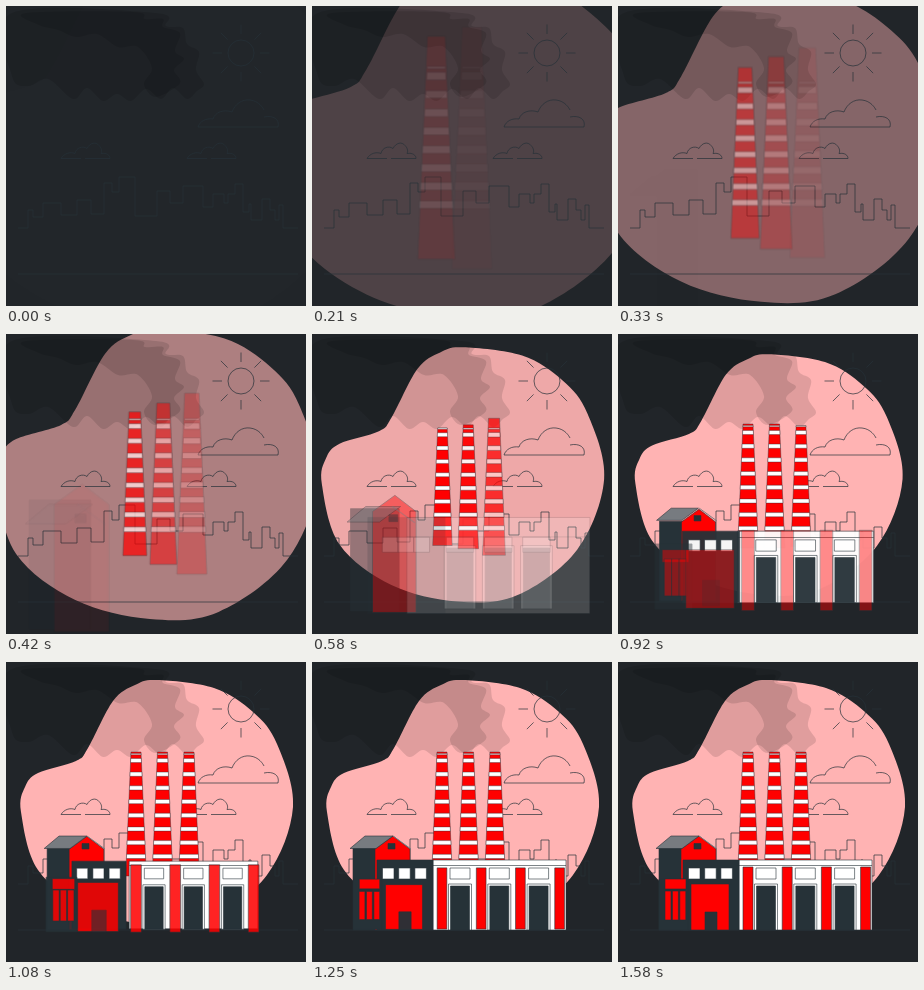
Animation, 300 px wide and 300 px high, one loop 1620 ms. Source, as an HTML page:

```html
<!DOCTYPE html>
<html lang="en">
<head>
<meta charset="utf-8">
<title>Factory</title>
<style>
html, body { margin: 0; width: 100%; height: 100%; overflow: hidden; background: #212529; }
svg { display: block; width: 100vw; height: 100vh; }
</style>
</head>
<body>
<svg id="stage" viewBox="0 0 300 300"></svg>
<script>
const INK = '#263238', RED = '#ff0000', WHITE = '#ffffff', GREY = '#777b80';
const LOOP = 1620, FRAME = 1000 / 24;
const START = -30, STEP = 110;
const stage = document.getElementById('stage');
const parts = [];

function add(parent, tag, attrs) {
  const el = document.createElementNS(stage.namespaceURI, tag);
  for (const key in attrs) el.setAttribute(key, attrs[key]);
  return parent.appendChild(el);
}

// Closed smooth curve through the points (Catmull-Rom)
function smooth(p) {
  const n = p.length;
  let d = 'M' + p[0];
  for (let i = 0; i < n; i++) {
    const a = p[(i + n - 1) % n], b = p[i], c = p[(i + 1) % n], e = p[(i + 2) % n];
    const c1 = [b[0] + (c[0] - a[0]) / 6, b[1] + (c[1] - a[1]) / 6];
    const c2 = [c[0] - (e[0] - b[0]) / 6, c[1] - (e[1] - b[1]) / 6];
    d += `C${c1} ${c2} ${c}`;
  }
  return d + 'Z';
}

// cubic-bezier(.36, -.01, .5, 1.38)
function ease(x) {
  if (x <= 0) return 0;
  if (x >= 1) return 1;
  let lo = 0, hi = 1;
  for (let i = 0; i < 24; i++) {
    const u = (lo + hi) / 2, v = 1 - u;
    if (1.08 * u * v * v + 1.5 * u * u * v + u * u * u < x) lo = u; else hi = u;
  }
  const u = lo, v = 1 - u;
  return -0.03 * u * v * v + 4.14 * u * u * v + u * u * u;
}

// Registers an element that shrinks from 1.5 to 1 while it fades in
function zoom(el, start, dur, cx, cy) {
  if (cx === undefined) {
    const b = el.getBBox();
    cx = b.x + b.width / 2;
    cy = b.y + b.height / 2;
  }
  parts.push({ el, start, dur, cx, cy });
  return el;
}

// Backdrop
const blobEdge = [
  [15, 150], [19, 125], [32, 111], [70, 99], [82, 86], [107, 39],
  [129, 23], [151, 18], [208, 26], [247, 50], [271, 82], [287, 145],
  [261, 213], [203, 257], [145, 263], [82, 247], [32, 208]
];
zoom(add(stage, 'path', { fill: '#ffb3b3', d: smooth(blobEdge) }), -28, 1000, 151, 143);

const wideSmoke = [
  [6, 7], [150, 7], [160, 20], [177, 22], [181, 38], [193, 46], [190, 64],
  [198, 78], [191, 85], [181, 93], [167, 82], [155, 93], [140, 83],
  [125, 95], [111, 88], [97, 95], [81, 82], [67, 93], [42, 73], [22, 80], [6, 70]
];
const darkSmoke = [
  [20, 7], [127, 6], [139, 13], [157, 13], [157, 21], [174, 27], [169, 45],
  [178, 53], [168, 64], [174, 77], [150, 91], [138, 78], [146, 62],
  [132, 41], [112, 41], [91, 28], [70, 31], [52, 24], [33, 19]
];
for (const edge of [wideSmoke, darkSmoke]) {
  add(stage, 'path', { fill: '#000', 'fill-opacity': 0.12, d: smooth(edge) });
}

const lines = add(stage, 'g', { fill: 'none', stroke: INK, 'stroke-width': 0.7 });
const line = d => add(lines, 'path', { d });

// Sun
add(lines, 'circle', { cx: 235, cy: 47, r: 13 });
for (let i = 0; i < 8; i++) {
  const c = Math.cos(i * Math.PI / 4), s = Math.sin(i * Math.PI / 4);
  line(`M${235 + 19 * c} ${47 + 19 * s} L${235 + 28.5 * c} ${47 + 28.5 * s}`);
}

// Clouds
line('M 258 111 c 9 -2 16 2 14 10 H 192 c 2 -6 8 -9 15 -8');
line('M 207 113 c 2 -7 11 -10 19 -7 c 3 -8 10 -13 18 -12 c 9 1 13 8 14 10');
for (const x of [55, 181]) {
  line(`M ${x + 20} 152.5 h -20 c 3 -5 9 -7 14 -5 c 1 -6 8 -8 12 -5`);
  line(`M ${x + 26} 142.5 c 3 -6 9 -7 12 -3 c 3 3 3 6 2 8 c 6 -1 9 2 9 5 h -25`);
}

// Skyline: each roof runs from x at height y
const roofs = [
  [12, 222], [22, 204], [27, 211], [37, 197], [55, 209], [71, 194], [85, 208],
  [98, 177], [106, 186], [113, 171], [129, 210], [151, 185], [164, 197],
  [177, 180], [197, 201], [207, 188], [218, 197], [222, 188], [229, 178],
  [237, 206], [243, 198], [245, 214], [256, 193], [264, 204], [269, 214],
  [273, 199], [277, 222]
];
line('M12 222' + roofs.map(([x, y]) => `H${x}V${y}`).join('') + 'H292');
line('M12 268H292');

// Factory: the group zooms as a whole, its pieces zoom one after another
const factory = add(stage, 'g', { stroke: INK, 'stroke-width': 0.6 });
function piece(k, d, fill, extra) {
  return zoom(add(factory, 'path', { d, fill, ...extra }), START + STEP * k, 800);
}
const box = (k, x, y, w, h, fill) => piece(k, `M${x} ${y}h${w}v${h}h${-w}Z`, fill);

function chimney(k, cx) {
  const half = y => 5 + (y - 90) * 0.043;
  const band = (y, h, fill) => {
    const a = half(y), b = half(y + h);
    piece(k, `M${cx - a} ${y}H${cx + a}L${cx + b} ${y + h}H${cx - b}Z`, fill, { 'stroke-width': 0.4 });
  };
  band(90, 124, RED);
  band(91.6, 1.2, WHITE);
  for (let i = 0; i < 8; i++) band(96.4 + i * 13.7, 4.2, WHITE);
}
[130, 156.5, 183].forEach((x, i) => chimney(i, x));

// House
box(3, 41, 186, 39, 82, INK);
piece(3, 'M 63 187 L 81 174 L 98 187 V 268 H 63 Z', RED);
piece(3, 'M 38 186.5 L 53 174 H 81 L 64 186.5 Z', GREY);
piece(3, 'M 81 174 L 99 187', 'none', { stroke: GREY, 'stroke-width': 1 });
box(3, 76, 181.5, 7, 5.5, INK);

// Long hall
box(4, 121, 198, 133, 70, WHITE);
piece(4, 'M 121 203.5 H 254', 'none');
for (let i = 0; i < 3; i++) {
  const x = 138 + i * 39.3;
  box(4, x, 206, 20, 11, WHITE);
  box(4, x - 1.5, 222, 23, 46, WHITE);
  box(4, x + 0.5, 224, 19, 44, INK);
}

// Front block
box(4, 65, 198, 56, 70, INK);
for (let i = 0; i < 3; i++) box(4, 70.5 + i * 16.2, 206, 11.5, 11, WHITE);
box(6, 41, 217, 29, 51, INK);
box(6, 47, 217, 21, 10, RED);
for (let i = 0; i < 3; i++) box(6, 47 + i * 7.4, 229, 6, 29, RED);
box(6, 73, 222, 38, 46, RED);
for (let i = 0; i < 4; i++) box(6, 125 + i * 39.2, 205, 10, 63, RED);
box(7, 87, 250, 12, 18, INK);

zoom(factory, START, 800, 147, 182);

function draw(time) {
  const t = Math.floor((time % LOOP + 4) / FRAME) * FRAME;
  for (const { el, start, dur, cx, cy } of parts) {
    const p = ease((t - start) / dur);
    const s = 1.5 - 0.5 * p;
    el.setAttribute('transform', `translate(${cx} ${cy}) scale(${s}) translate(${-cx} ${-cy})`);
    el.setAttribute('opacity', Math.max(0, Math.min(1, p)));
  }
}

const begin = performance.now();
function tick() {
  draw(performance.now() - begin);
  requestAnimationFrame(tick);
}
tick();
</script>
</body>
</html>
```
